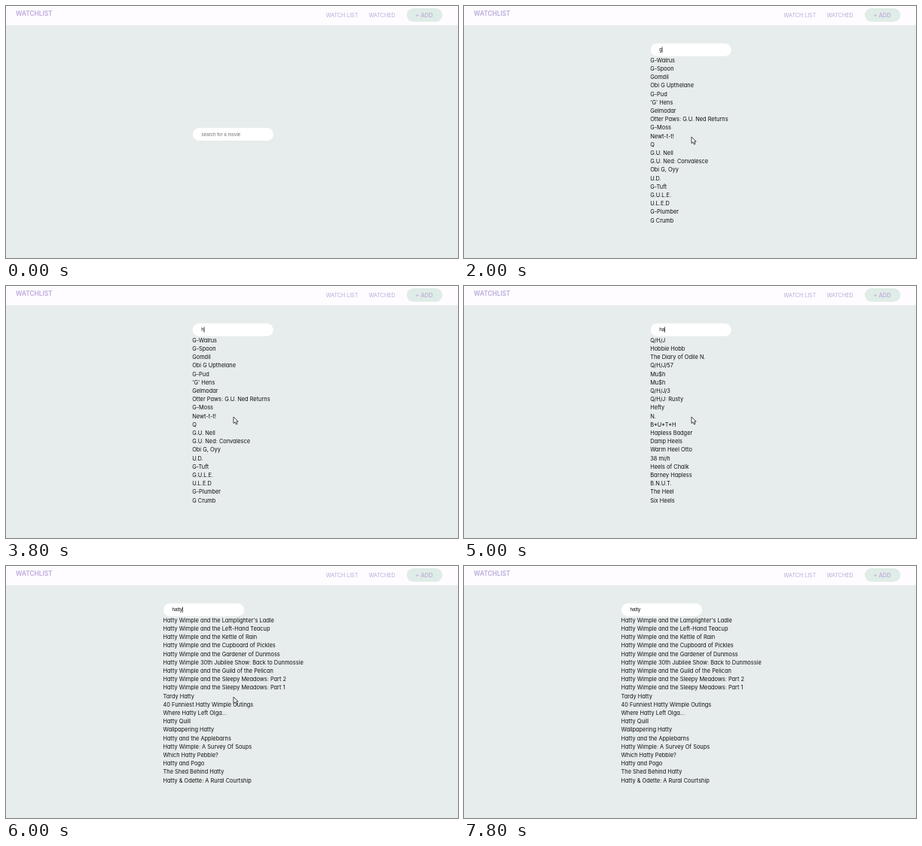
Write an HTML page that moves like this. It is 600 px wide and 335 px high and loops after 8000 ms.

```html
<!DOCTYPE html>
<html lang="en">
<head>
<meta charset="utf-8">
<title>Watchlist search</title>
<style>
  html, body { margin: 0; width: 100%; height: 100%; overflow: hidden; background: #e7edec; }
  svg { display: block; width: 100%; height: 100%; }
  text { font-family: Inter, "Open Sans", sans-serif; white-space: pre; }
  .nav { fill: #bba9dc; font-size: 7.1px; }
  .brand { font-size: 8.3px; font-weight: 600; }
  .add { font-size: 7.5px; font-weight: 500; }
  .field text { font: 6.3px "Liberation Sans", Arial, sans-serif; }
  #list { fill: #111; font-size: 7.4px; font-feature-settings: "cv11"; }
</style>
</head>
<body>
<svg viewBox="0 0 600 335">
  <rect width="600" height="335" fill="#e7edec"/>
  <rect width="600" height="25.5" fill="#fefcfe"/>
  <g class="nav">
    <text class="brand" x="13" y="13">WATCHLIST</text>
    <text x="424.5" y="15">WATCH LIST</text>
    <text x="481.5" y="15">WATCHED</text>
    <rect x="532" y="3" width="47.3" height="18" rx="9" fill="#dfece7"/>
    <text class="add" x="543.5" y="15">+ ADD</text>
  </g>
  <g id="field" class="field">
    <rect width="107" height="17" rx="8.5" fill="#fff"/>
    <text id="query" x="11.5" y="10.5"></text>
    <rect id="caret" y="4.5" width="0.7" height="7.5" fill="#111"/>
  </g>
  <g id="list"></g>
  <path id="pointer" d="M0 0V8.6L2 6.8L3.5 10L5 9.3L3.6 6.2H6.2Z" fill="#fff" stroke="#333" stroke-width="0.9" stroke-linejoin="round"/>
</svg>
<script>
const LOOP = 8000;
const $ = id => document.getElementById(id);
const [field, query, caret, list, pointer] = ["field", "query", "caret", "list", "pointer"].map($);

const results = {
  none: { x: 248, titles: [] },
  g: { x: 247.7, titles: [
    "G-Walrus", "G-Spoon", "Gomdil", "Obi G Upthelane", "G-Pud", "'G' Hens", "Gelmodar",
    "Otter Paws: G.U. Ned Returns", "G-Moss", "Newt-t-t!", "Q", "G.U. Nell",
    "G.U. Ned: Convalesce", "Obi G, Oyy", "U.D.", "G-Tuft", "G.U.L.E.", "U.L.E.D",
    "G-Plumber", "G Crumb"] },
  h: { x: 247.7, titles: [
    "Q/H/J", "Hobbie Hobb", "The Diary of Odile N.", "Q/H/J/57", "Mu$h", "Mu$h", "Q/H/J/3",
    "Q/H/J: Rusty", "Hefty", "N.", "B*U*T*H", "Hapless Badger", "Damp Heels",
    "Warm Heel Otto", "38 mi/h", "Heels of Chalk", "Barney Hapless", "B.N.U.T.",
    "The Heel", "Six Heels"] },
  hat: { x: 228.5, titles: [
    "There Is Our Lamp", "Bol Bol Dhruvesh", "Bol Bol Nadiye", "Prima Peru Finland",
    "Tilda Rows to Shore", "Everything Was Mislaid", "The Borrowed Ladder",
    "Bol Bol Suryadev", "Kvarten: Nu cyklar...", "Hut", "Dusk Had 4000 Ears",
    "We've Sat There", "Hillside", "Kan du se Ottilie?", "None Of The Rest",
    "Ulv Heim - The Late Had It Simple", "Endast Norrland norska trumpetare ser",
    "Dad's Hats", "(The Usefulness Of) Hats", "Ni som dit utvandren..."] },
  hatty: { x: 209, titles: [
    "Hatty Wimple and the Lamplighter's Ladle", "Hatty Wimple and the Left-Hand Teacup",
    "Hatty Wimple and the Kettle of Rain", "Hatty Wimple and the Cupboard of Pickles",
    "Hatty Wimple and the Gardener of Dunmoss",
    "Hatty Wimple 30th Jubilee Show: Back to Dunmossie",
    "Hatty Wimple and the Guild of the Pelican",
    "Hatty Wimple and the Sleepy Meadows: Part 2",
    "Hatty Wimple and the Sleepy Meadows: Part 1", "Tardy Hatty",
    "40 Funniest Hatty Wimple Outings", "Where Hatty Left Olga...", "Hatty Quill",
    "Wallpapering Hatty", "Hatty and the Applebarns", "Hatty Wimple: A Survey Of Soups",
    "Which Hatty Pebble?", "Hatty and Pogo", "The Shed Behind Hatty",
    "Hatty & Odette: A Rural Courtship"] }
};

// Each track lists [start ms, value]; the latest start wins.
const typed = [[0, ""], [1600, "g"], [3200, ""], [3800, "h"], [5000, "ha"], [5200, "hat"], [5400, "hatt"], [5600, "hatty"]];
const shown = [[0, "none"], [1800, "g"], [4000, "h"], [5400, "hat"], [5800, "hatty"]];
const blink = [[0, 0], [1400, 1], [2600, 0], [3200, 1], [4400, 0], [5000, 1], [6600, 0], [7200, 1], [7800, 0]];
const at = (track, t) => track.reduce((value, [start, v]) => t >= start ? v : value, track[0][1]);

const ease = (t, a, b) => {
  const p = Math.min(1, Math.max(0, (t - a) / (b - a)));
  return p * p * (3 - 2 * p);
};
const place = (el, x, y) => el.setAttribute("transform", `translate(${x} ${y})`);
const show = (el, on) => el.setAttribute("visibility", on ? "visible" : "hidden");

let current = "";
function fillList(key) {
  if (key === current) return;
  current = key;
  const { x, titles } = results[key];
  list.replaceChildren(...titles.map((title, i) => {
    const line = document.createElementNS(list.namespaceURI, "text");
    line.setAttribute("x", x - 0.5);
    line.setAttribute("y", 74.7 + i * 11.21);
    line.textContent = title;
    return line;
  }));
}

function draw(t) {
  const key = at(shown, t), word = at(typed, t);
  fillList(key);
  place(field, results[key].x, key === "none" ? 162 : 49.8);
  query.textContent = word || "search for a movie";
  query.setAttribute("fill", word ? "#111" : "#757575");
  caret.setAttribute("x", 11.5 + (word ? query.getComputedTextLength() : 0));
  show(caret, at(blink, t));

  const come = ease(t, 200, 1200), go = ease(t, 6200, 7100);
  place(pointer, 560 - 258 * come + 232 * go, 8 + 166 * come + 108 * go);
  show(pointer, t >= 200 && t < 7200);
}

const begin = performance.now();
function tick() {
  draw((performance.now() - begin) % LOOP);
  requestAnimationFrame(tick);
}
tick();
</script>
</body>
</html>
```
